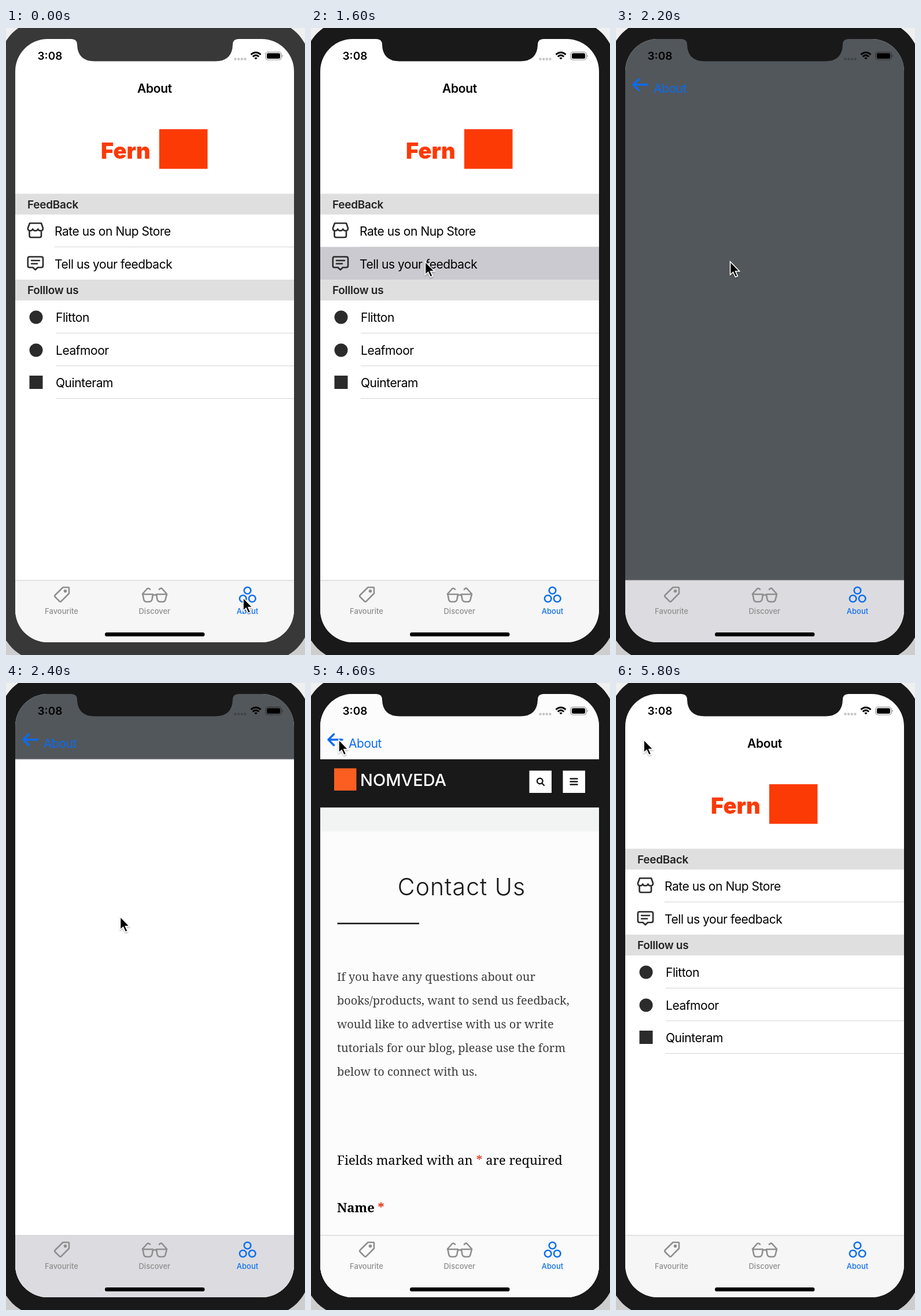
These frames come from a looping animation (517x1084 px, 6 s). An HTML page:

```html
<!DOCTYPE html>
<html lang="en">
<head>
<meta charset="utf-8">
<title>About screen</title>
<style>
html, body { margin: 0; width: 100%; height: 100%; overflow: hidden; background: #e4e4e4; }
svg { display: block; width: 517px; height: 1084px; }
text { font-family: Inter, Roboto, sans-serif; white-space: pre; }
.row { font-size: 21px; letter-spacing: -.45px; }
.title { font-size: 21px; font-weight: 600; letter-spacing: -.3px; }
.head { font-size: 19px; font-weight: 600; letter-spacing: -.28px; fill: #222; }
.tab { font-size: 13px; font-weight: 500; text-anchor: middle; fill: #8e8e8e; }
.body { font: 20px "Noto Serif", serif; fill: #3c3c3c; }
.form { font: 22px "Noto Serif", serif; }
.line { fill: none; stroke-linecap: round; stroke-linejoin: round; }
</style>
</head>
<body>
<svg viewBox="0 0 517 1084">
  <defs>
    <linearGradient id="wall" x2="0" y2="1">
      <stop stop-color="#f0f0f0"/><stop offset="1" stop-color="#cdcdcd"/>
    </linearGradient>
    <linearGradient id="blur" gradientUnits="userSpaceOnUse" x1="-40" x2="56">
      <stop stop-color="#dcdce0" stop-opacity="0"/><stop offset="1" stop-color="#dcdce0"/>
    </linearGradient>
    <clipPath id="screen"><rect x="16" y="19" width="482" height="1043" rx="56"/></clipPath>
    <filter id="soft" x="-50%" y="-50%" width="200%" height="200%">
      <feDropShadow dx="0" dy="1.5" stdDeviation="1.2" flood-opacity=".35"/>
    </filter>
  </defs>

  <rect width="517" height="1084" fill="url(#wall)"/>
  <rect id="phone" x="-12" y="-14" width="538" height="1109" rx="78"/>

  <g clip-path="url(#screen)">
    <rect x="16" y="19" width="482" height="1043" fill="#fff"/>

    <g id="list">
      <text x="164" y="226" font-size="38" font-weight="900" fill="#fc3a05">Fern</text>
      <rect x="265" y="175" width="83.500" height="68.500" fill="#fc3a05"/>
      <rect id="mark" x="16" y="378.500" width="482" height="57" fill="#cbcad0"/>
      <g id="rows"></g>
      <g class="line" stroke="#2b2b2b" stroke-width="2.600">
        <path d="M41 337.500H61L64 346Q64 350.500 60 350.500Q56 350.500 55.300 347.500Q54.500 350.500 50.700 350.500Q47 350.500 46.200 347.500Q45.400 350.500 41.500 350.500Q37.800 350.500 37.800 346ZM40.500 351V359Q40.500 362 43.500 362H58Q61 362 61 359V351"/>
        <path d="M40.500 395.500H61Q64 395.500 64 398.500V411Q64 414 61 414H55L50.800 418L46.500 414H40.500Q37.800 414 37.800 411V398.500Q37.800 395.500 40.500 395.500ZM44 402H58M44 407.500H54"/>
      </g>
      <g fill="#2b2b2b">
        <circle cx="52" cy="500" r="11.500"/>
        <circle cx="52" cy="557" r="11.500"/>
        <rect x="40.500" y="601" width="23" height="23"/>
      </g>
    </g>
    <rect id="dim" x="16" y="19" width="482" height="1043"/>

    <g id="page">
      <rect id="nav" x="16" y="19" width="482" height="1043"/>
      <g id="web">
        <rect id="paper" x="16" y="132" width="482" height="930"/>
        <rect x="16" y="131.500" width="482" height="1" fill="#c9c9cb"/>
      </g>
      <g id="site">
        <rect x="16" y="132" width="482" height="83.500" fill="#191919"/>
        <rect x="16" y="215.500" width="482" height="41" fill="#f1f4f3"/>
        <rect x="40" y="147.500" width="38.500" height="38.500" fill="#fb5e20"/>
        <text x="85" y="177.500" font-size="29" font-weight="500" fill="#fff">NOMVEDA</text>
        <path d="M377.500 151.500h38.500v38.500h-38.500zM435.500 151.500h38.500v38.500h-38.500z" fill="#fff"/>
        <text x="260.500" y="366.500" font-size="41" font-weight="300" letter-spacing="1" text-anchor="middle" fill="#191919">Contact Us</text>
        <rect x="45.500" y="414.500" width="141.500" height="2.600" fill="#191919"/>
      </g>
      <rect id="field" x="45.500" y="921" width="428.500" height="60" rx="4" fill="#ebebeb"/>
      <g id="copy">
        <g class="line" stroke="#191919" stroke-width="2.400">
          <circle cx="395.800" cy="169.500" r="4.800"/>
          <path d="M399.500 173.500L403 177M448.500 165.500H460.500M448.500 170.500H460.500M448.500 175.500H460.500"/>
        </g>
        <g id="lines"></g>
        <text class="form" x="45" y="833">Fields marked with an <tspan fill="#e3260c">*</tspan> are required</text>
        <text class="form" x="45" y="915" style="font-weight:700">Name <tspan fill="#e3260c">*</tspan></text>
      </g>
    </g>

    <path id="arrow" class="line" d="M39.500 88.500L30 98L39.500 107.500M30.500 98H54" stroke="#0b6cf2" stroke-width="3.400"/>
    <text id="title" class="title" y="111.500">About</text>
    <text id="back" class="row" y="111.500" fill="#0b6cf2">About</text>

    <rect x="16" y="955" width="482" height="107" fill="#f6f6f6"/>
    <rect id="tint" x="-40" y="955" width="540" height="107"/>
    <rect x="16" y="954.500" width="482" height="1" fill="#cbcbcd"/>
    <g class="line" stroke="#8e8e8e" stroke-width="2.600">
      <path d="M98.500 967H107.500Q109 967 109 968.500V977.500L95.500 991.200Q94 992.500 92.500 991.200L84.800 983.500Q83.500 982 84.800 980.500Z"/>
      <circle cx="102.500" cy="973.500" r="1.500" fill="#8e8e8e"/>
      <path d="M236 978.500L244 969.500Q246 967.500 249 970.500M278 978.500L270 969.500Q268 967.500 265 970.500M236 979H254L252.500 988Q251.500 992 247 992H243Q239 992 238.200 988L236.500 979M260 979H278L275.700 988Q275 992 271 992H267Q262.500 992 261.500 988ZM254 981Q257 979 260 981"/>
    </g>
    <g fill="none" stroke="#0f6fee" stroke-width="2.600">
      <circle cx="417.500" cy="972.500" r="5.800"/>
      <circle cx="409.700" cy="986.500" r="5.800"/>
      <circle cx="425.700" cy="986.500" r="5.800"/>
    </g>
    <text class="tab" x="96" y="1013">Favourite</text>
    <text class="tab" x="256.800" y="1013">Discover</text>
    <text class="tab" x="417.500" y="1013" style="fill:#0f6fee">About</text>
    <rect x="171" y="1045" width="172.500" height="6.800" rx="3.400"/>

    <text x="54.500" y="55" font-size="19" font-weight="600">3:08</text>
    <path class="line" d="M396.500 53.800h0M402.200 53.800h0M407.800 53.800h0M413.500 53.800h0" stroke="#000" stroke-opacity=".22" stroke-width="4.500"/>
    <g class="line" stroke="#000" stroke-width="3" style="stroke-linecap:butt">
      <path d="M423.500 46Q432 38.500 440.500 46M426.700 49.500Q432 44.800 437.300 49.500"/>
      <path d="M429.300 51.700Q432 49.700 434.700 51.700L432 54.500Z" fill="#000" stroke="none"/>
    </g>
    <rect x="449" y="41.500" width="27" height="13.500" rx="4" fill="none" stroke="#000" stroke-opacity=".45" stroke-width="1.200"/>
    <rect x="451" y="43.500" width="23" height="9.500" rx="2.300"/>
    <path d="M477.500 46Q480 48.200 477.500 50.500Z" fill-opacity=".5"/>
  </g>
  <path id="notch" d="M113 18V19Q123 19 123 29Q124 57.500 153 57.500H362Q391 57.500 392 29Q392 19 402 19V18Z"/>
  <path id="cursor" d="M0 0V22.500L5 18L9 26.500L12.800 24.800L9 16.500H16Z" stroke="#fff" stroke-width="1.600" filter="url(#soft)"/>
</svg>
<script>
const $ = id => document.getElementById(id);
const set = (id, attrs) => { for (const k in attrs) $(id).setAttribute(k, attrs[k]); };
const show = (id, on) => set(id, { visibility: on ? "visible" : "hidden" });

const text = (cls, x, y, s) => `<text class="${cls}" x="${x}" y="${y}">${s}</text>`;
const bar = (x, y, h, fill) => `<rect x="${x}" y="${y}" width="${498 - x}" height="${h}" fill="${fill}"/>`;
const section = (y, s) => bar(16, y, 36, "#dfdfdf") + text("head", 37, y + 25, s);

$("rows").innerHTML =
  section(286.5, "FeedBack") + section(435, "Folllow us") +
  bar(84, 378, 1, "#d4d4d6") + [527, 583.5, 640].map(y => bar(86, y, 1, "#d4d4d6")).join("") +
  text("row", 84, 359, "Rate us on Nup Store") +
  text("row", 84, 415.5, "Tell us your feedback") +
  ["Flitton", "Leafmoor", "Quinteram"].map((s, i) => text("row", 86, 508 + i * 56.6, s)).join("");

$("lines").innerHTML = [
  "If you have any questions about our",
  "books/products, want to send us feedback,",
  "would like to advertise with us or write",
  "tutorials for our blog, please use the form",
  "below to connect with us."
].map((s, i) => text("body", 45, 514.5 + i * 41, s)).join("");

const LOOP = 6000, TICK = 200, WIDTH = 482;

// [ms, value]: each value holds until the next entry
const push = [[0, 0], [1800, .882], [2000, .99], [2200, 1], [5000, .12], [5200, .01], [5400, 0]];
const load = [[0, 0], [2400, 1], [3000, 2], [3200, 3]];
const press = [[0, 0], [1600, 1], [1800, .68], [2000, 0]];
const pointer = [
  [0, [410, 985]], [200, [396, 915]], [400, [338, 715]], [600, [248, 495]],
  [800, [188, 384]], [1000, [193, 395]], [1200, [197.5, 404]],
  [3600, [188, 384]], [3800, [146, 296]], [4000, [86, 182]],
  [4200, [42, 114]], [4400, [36, 100]], [4600, [48, 98]]
];
const at = (steps, t) => steps.filter(s => s[0] <= t).pop()[1];

function draw(t) {
  const p = at(push, t), stage = at(load, t), [x, y] = at(pointer, t);
  const left = WIDTH * (1 - p), titleX = 65 + 162 * (1 - p);
  const body = t < 1400 ? "#383838" : "#191919";
  const loaded = stage > 1;

  set("phone", { fill: body });
  set("notch", { fill: body });
  set("list", { transform: `translate(${-.3 * WIDTH * p})` });
  set("mark", { opacity: at(press, t) });
  set("dim", { opacity: .1 * p });

  show("page", p > 0);
  set("page", { transform: `translate(${left})` });
  set("nav", { fill: loaded ? "#fcfcfc" : "#52575b" });
  set("paper", { fill: loaded ? "#fcfcfc" : "#fff" });
  for (const [id, on] of [["web", stage > 0], ["site", loaded], ["field", stage === 2], ["copy", stage === 3]])
    set(id, { display: on ? "inline" : "none" });

  set("arrow", { opacity: t === 4800 ? .35 : p });
  set("back", { x: titleX, opacity: t === 4800 ? .35 : p });
  set("title", { x: titleX, opacity: 1 - p });

  show("tint", p > 0);
  set("tint", {
    fill: loaded ? "#fafafa" : p < 1 ? "url(#blur)" : "#dcdce0",
    transform: `translate(${left})`
  });
  set("cursor", { transform: `translate(${x} ${y})` });
}

function tick() {
  const t = performance.now() % LOOP;
  draw(t - t % TICK);
  requestAnimationFrame(tick);
}
tick();
</script>
</body>
</html>
```
